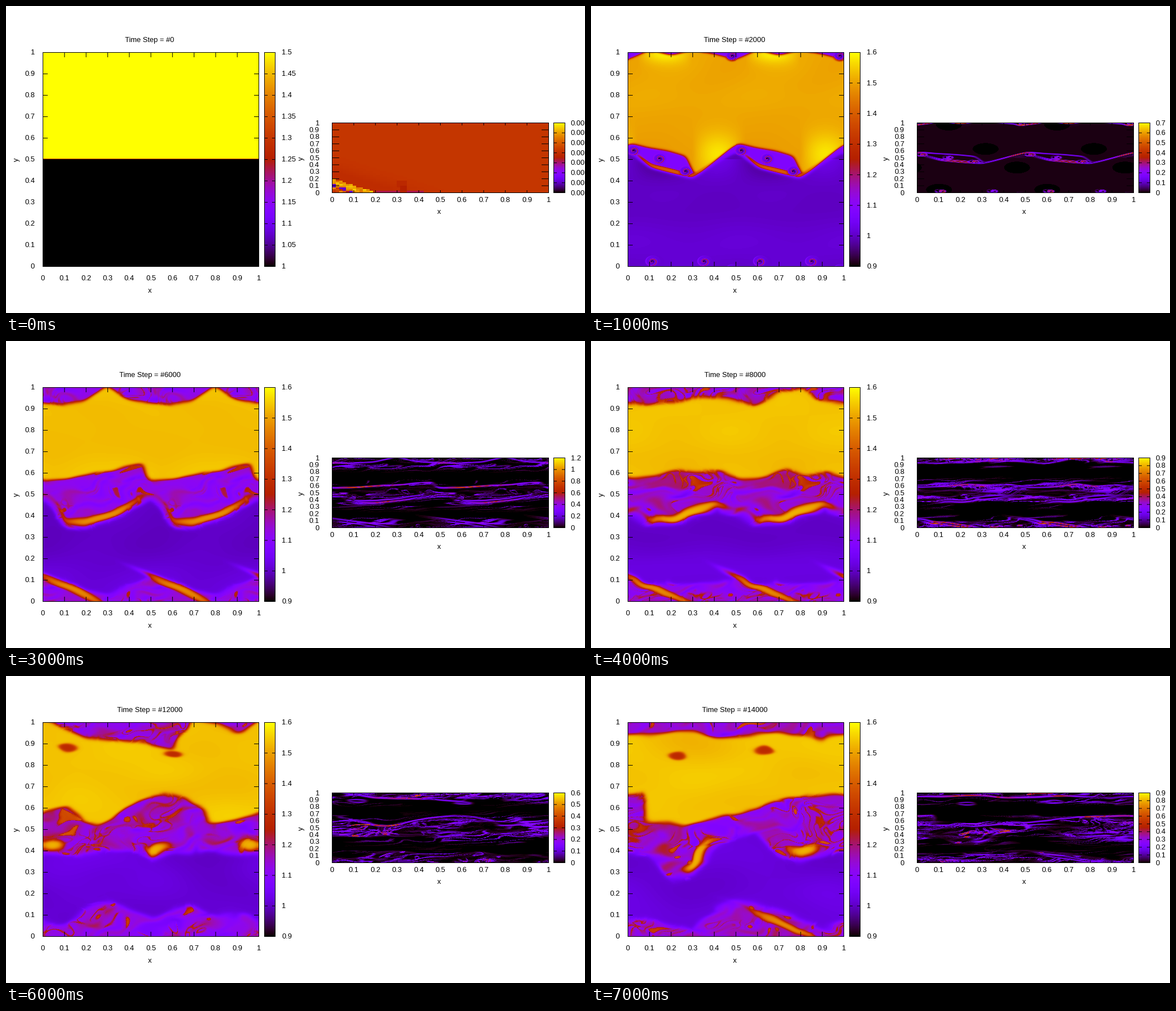
Write a matplotlib script that moves like this. It is 1027 px wide and 545 px high and loops after 8000 ms.

```python
import numpy as np
import matplotlib.pyplot as plt
from matplotlib.animation import FuncAnimation

W, H, DPI = 1027, 545, 64
PT = 72 / DPI
NX, NY = 384, 380
LEFT = (65.5, 448.5, 82.5, 462.5)
LEFT_BAR = (458.5, 477.5, 82.5, 462.5)
RIGHT = (578.5, 962.5, 207.5, 331.5)
RIGHT_BAR = (971.5, 991.5, 207.5, 331.5)

plt.rcParams["font.family"] = "Liberation Sans"
X, Y = np.meshgrid((np.arange(NX) + .5) / NX, (np.arange(NY) + .5) / NY)

# Heights of the four interfaces at even steps in x: both sides of the middle
# layer, then both sides of the layer that wraps from the top to the floor.
KEYS = {
    1: dict(top=[.577, .555, .54, .515, .42], bottom=[.535, .455, .43, .405, .475],
            roof=[.965, 1.01, .985, 1.01, .99], floor=[-.02] * 5,
            beads=[.2], size=(.14, .009),
            curls=[(.025, .54), (.145, .502), (.265, .443), (.48, .982), (.11, .022), (.35, .022)]),
    3: dict(top=[.56, .57, .6, .61, .648], bottom=[.475, .345, .343, .37, .42],
            roof=[.928, .915, .945, 1.01, .94], floor=[.112, .095, .05, .03, .075],
            beads=[.27], size=(.17, .016), ribbons=[.14]),
    5: dict(top=[.58, .61, .622, .595, .59, .575, .585, .635, .565, .575],
            bottom=[.33, .36, .38, .405, .43, .335, .36, .385, .41, .43],
            roof=[.92, .92, .918, .9, .97, .94, .91, 1, .985, .94],
            floor=[.085, .07, .12, .122, .108, .09, .05, .13, .118, .1],
            beads=[.15, .47, .72], size=(.06, .016), ribbons=[.12, .58],
            drops=[(.05, .877), (.61, .882)]),
    6: dict(top=[.58, .605, .535, .525, .63, .668, .645, .61, .515, .535],
            bottom=[.38, .387, .38, .402, .41, .345, .39, .39, .395, .385],
            roof=[1.01, .965, .93, .92, .915, .895, .875, 1.02, 1, .945],
            floor=[.08, .045, .14, .162, .115, .08, .125, .138, .09, .12],
            beads=[.05, .53, .965], size=(.045, .024), drops=[(.11, .885), (.6, .853)]),
    7: dict(top=[.675, .53, .525, .51, .54, .57, .615, .65, .66, .665],
            bottom=[.395, .375, .26, .28, .41, .47, .485, .37, .35, .375],
            roof=[.945, .94, .953, .957, .925, .93, .937, .957, .94, .915],
            floor=[.085, .075, .045, .025, .14, .168, .15, .12, .08, .03],
            beads=[.32, .82], size=(.06, .024), ribbons=[.72],
            drops=[(.225, .843), (.62, .868)]),
}


# ---------- field building blocks ----------
def noise(seed, lx, ly, halves, tilt=0.0):
    """Periodic smooth noise with unit variance, stretched along x."""
    rng = np.random.default_rng(seed)
    kx = np.fft.fftfreq(NX) * NX
    ky = (np.fft.fftfreq(NY) * NY)[:, None]
    g = np.exp(-2 * np.pi**2 * (((kx + tilt * ky) * lx)**2 + (ky * ly)**2))
    n = np.fft.ifft2(np.fft.fft2(rng.standard_normal((NY, NX))) * g).real
    if halves:
        n = n + np.roll(n, NX // 2, axis=1)
    return (n - n.mean()) / n.std()


def displaced(n, u, v):
    """Sample a periodic field at points moved by (u, v)."""
    cols = np.round(X * NX - .5 + u * NX).astype(int) % NX
    rows = np.round(Y * NY - .5 + v * NY).astype(int) % NY
    return n[rows, cols]


def step(d, soft):
    return .5 * (1 + np.tanh(d / soft))


def wrap(d):
    return d - np.round(d)


def blend(f, value, mask):
    f += (value - f) * mask


def heights(name, i):
    """Interface heights over the full width, eased between key states."""
    full = [np.tile(k[name], 10 // len(k[name])) for k in KEYS.values()]
    return [np.interp(i, list(KEYS), h) for h in zip(*full)]


def above(x, y, levels):
    """Signed distance above a smooth periodic interface."""
    n = 768
    t = np.arange(n) / n
    c = np.interp(t, np.arange(len(levels)) / len(levels), levels, period=1)
    k = np.fft.rfftfreq(n) * n
    c = np.fft.irfft(np.fft.rfft(c) * np.exp(-2 * (np.pi * k * .016)**2), n)
    slope = np.interp(x, t, np.gradient(c, 1 / n), period=1)
    return (y - np.interp(x, t, c, period=1)) / np.sqrt(1 + slope**2)


def curl(f, u, v, r):
    """A rolled-up vortex: a dark core inside a thin red spiral."""
    rho = np.hypot(u / 1.25, v)
    arm = np.cos(np.arctan2(v, u) + 9 * rho / r)
    value = 1.03 + .24 * np.maximum(arm, 0)**3 - .12 * np.exp(-(rho / (.35 * r))**2)
    blend(f, value, step(r - rho, .004))


def build(i):
    """Density field and gradient picture of state i."""
    marks = KEYS.get(i, KEYS[3])
    halves = i < 5
    copies = (0, .5) if halves else (0,)
    grown = min((i - 1) / 3, 1)
    soft = .005 + .003 * grown

    def make(n, *args):
        return noise(10 * i + n, *args)

    wx, wy = make(0, .04, .025, halves), make(1, .035, .02, halves)
    x = X + .007 * grown * wx
    y = Y + .004 * grown * wy

    # Compression ahead of each wave crest, fading as the layers mix.
    crest = np.cos(4 * np.pi * (X - .42))
    glow = crest * (np.exp(-((Y - .52) / .1)**2) - np.exp(-((Y - 1) / .05)**2)) / i**1.5
    calm = .006 * make(2, .12, .06, halves)
    hi = 1.54 - .035 * np.exp(1 - i) + calm + .08 * np.maximum(glow, 0)
    lo = 1 + .002 * i + calm + .04 * glow * (Y < .5)

    # Stirred fluid: folded streaks, red filaments and a few hot spots.
    u, v = .03 * wx, .02 * wy
    folds = displaced(make(3, .03, .012, halves, .3), u, v)
    spots = displaced(make(4, .018, .011, halves, .3), u, v)
    patch = np.clip(make(5, .08, .03, halves) + .2, 0, 1.2)
    stirred = 1.06 + .018 * min(i, 4) + grown * (
        .03 * folds + .11 * patch * np.exp(-(spots / .3)**2) + .2 * step(spots - 1.9, .25))

    top = above(x - .6 * (y - .57), y, heights("top", i))
    bottom, roof, floor = (above(x, y, heights(k, i)) for k in ("bottom", "roof", "floor"))
    f = lo + (stirred - lo) * step(bottom, 1.4 * soft)
    blend(f, hi, step(top, soft))
    blend(f, stirred, step(roof, soft))
    blend(f, stirred, step(-floor, 1.4 * soft))

    length, thick = marks["size"]
    for dx in copies:
        for cx in marks["beads"]:
            across = (bottom - 1.7 * thick) / thick
            bead = 1 - np.hypot(wrap(x - cx - dx) / length, across)
            blend(f, 1.4 + .12 * grown, step(bead, .35))
        for cx in marks.get("ribbons", []):
            run = wrap(x - cx - dx)
            band = 1 - np.hypot(run / .15, (y - .055 + .45 * run) / .016)
            blend(f, 1.47, step(band, .4))
        for cx, cy in marks.get("drops", []):
            drop = 1 - np.hypot(wrap(x - cx - dx) / .04, (y - cy) / .018)
            blend(f, 1.28, step(drop, .3))
        for cx, cy in marks.get("curls", []):
            curl(f, wrap(X - cx - dx), wrap(Y - cy), .022)

    gy, gx = np.gradient(f, 1 / NY, 1 / NX)
    g = np.hypot(.25 * gx, gy)
    g = .3 * np.clip(g / np.percentile(g, 99), 0, 1.3)**1.3
    g *= .7 + .6 * np.clip(make(6, .1, .04, halves), 0, 1.6)
    if i == 1:
        g += .012
        for cx, cy in ((.315, .62), (.46, .36), (.145, .97), (.1, .04)):
            hole = np.hypot(wrap(2 * (X - cx)) / .12, (Y - cy) / .085) < 1
            g[hole & (g < .03)] = 0
    else:
        layers = np.exp(-((Y - .48) / .18)**4) + np.exp(-(wrap(Y) / .15)**4)
        for n in (7, 9):
            lines = np.exp(-(displaced(make(n, .1, .011, halves, .2), u, .5 * v) / .17)**2)
            where = np.clip(make(n + 1, .11, .03, halves), 0, 1.5)
            g = np.maximum(g, .22 * lines * where * layers)
    return f, g[1:379].reshape(126, 3, NX).max(axis=1)


def initial():
    f = np.where(Y > .5, 1.5, 1.0)
    f[NY // 2] = 1.25
    x, y = np.meshgrid((np.arange(64) + .5) / 64, (np.arange(42) + .5) / 42)
    r = np.random.default_rng(4).standard_normal(x.shape)
    d = y + x - .2
    g = .595 - .04 * np.exp(-((d - .05) / .16)**2)
    g[(x > .29) & (x < .35) & (y > .08) & (y < .17)] = .54
    g[(y < .024) & (x > .2) & (x < .42)] = .45
    g[(y < .1) & (x > .31) & (x < .35)] = .5
    wedge = (d < 0) & (d > -.11)
    g[wedge] = .84 + .05 * r[wedge]
    g[(d <= -.08) & (d > -.11) & (r > -.3)] = .15
    g[d <= -.11] = .64 + .1 * r[d <= -.11]
    return f, np.clip(g, 0, 1)


# ---------- stage ----------
fig = plt.figure(figsize=(W / DPI, H / DPI), dpi=DPI, facecolor="white")
ax = fig.add_axes((0, 0, 1, 1))
ax.axis("off")


def picture(box, data):
    x0, x1, y0, y1 = box
    return ax.imshow(data, extent=(x0, x1, y1, y0), origin="lower", cmap="gnuplot",
                     vmin=0, vmax=1, aspect="auto", interpolation="nearest")


def line(xs, ys):
    return ax.plot(xs, ys, color="black", lw=PT, solid_capstyle="projecting",
                   solid_joinstyle="miter", snap=False, zorder=3)[0]


def label(x, y, text, ha="center", **kw):
    return ax.text(x, y, text, ha=ha, va="baseline", size=12.9 * PT, color="black", **kw)


def frame(box):
    x0, x1, y0, y1 = box
    line([x0, x1, x1, x0, x0], [y0, y0, y1, y1, y0])


def axes_box(box, xtick, ytick, label_gap, label_x):
    frame(box)
    x0, x1, y0, y1 = box
    for i in range(11):
        px, py = x0 + (x1 - x0) * i / 10, y1 - (y1 - y0) * i / 10
        line([px, px], [y1, y1 - xtick])
        line([px, px], [y0, y0 + xtick])
        line([x0, x0 + ytick], [py, py])
        line([x1, x1 - ytick], [py, py])
        label(px, y1 + label_gap, f"{i / 10:g}")
        label(label_x, py + 4, f"{i / 10:g}", "right")


def bar_ticks(box, names, text_x):
    x0, x1, y0, y1 = box
    made = []
    for i, name in enumerate(names):
        py = y1 - (y1 - y0) * i / (len(names) - 1)
        made += [line([x0, x0 + 5], [py, py]), line([x1, x1 - 5], [py, py]),
                 label(text_x, py + 4, name, "left")]
    return made


def scale(lo, hi, gap):
    return [f"{v:g}" for v in np.round(np.arange(lo, hi + gap / 2, gap), 2)]


states = [initial()] + [build(i) for i in range(1, 8)]
peaks = [0, .7, .9, 1.2, .9, .8, .6, .9]

field = picture(LEFT, states[0][0])
grad = picture(RIGHT, states[0][1])
for bar in (LEFT_BAR, RIGHT_BAR):
    picture(bar, np.linspace(0, 1, 256)[:, None])
    frame(bar)
axes_box(LEFT, 8, 8, 24.5, 51)
axes_box(RIGHT, 4, 12, 16, 556)
label(255, 509, "x")
label(768.5, 369, "x")
label(19, 273, "y", rotation=90)
label(524, 270.5, "y", rotation=90)
title = label(255, 64, "")
ax.set_xlim(0, W)
ax.set_ylim(H, 0)
ticks = []


def draw(i):
    f, g = states[i]
    lo, hi, gap = (1, 1.5, .05) if i == 0 else (.9, 1.6, .1)
    field.set_data(f)
    field.set_clim(lo, hi)
    grad.set_data(g)
    title.set_text(f"Time Step = #{2000 * i}")
    while ticks:
        ticks.pop().remove()
    peak = peaks[i]
    names = scale(0, peak, .2 if peak > 1 else .1) if peak else ["0.00"] * 8
    ticks.extend(bar_ticks(LEFT_BAR, scale(lo, hi, gap), 489))
    ticks.extend(bar_ticks(RIGHT_BAR, names, 1002))
    return [field, grad, title, *ticks]


anim = FuncAnimation(fig, draw, frames=len(states), interval=1000, repeat=True, repeat_delay=0)
plt.show()
```
